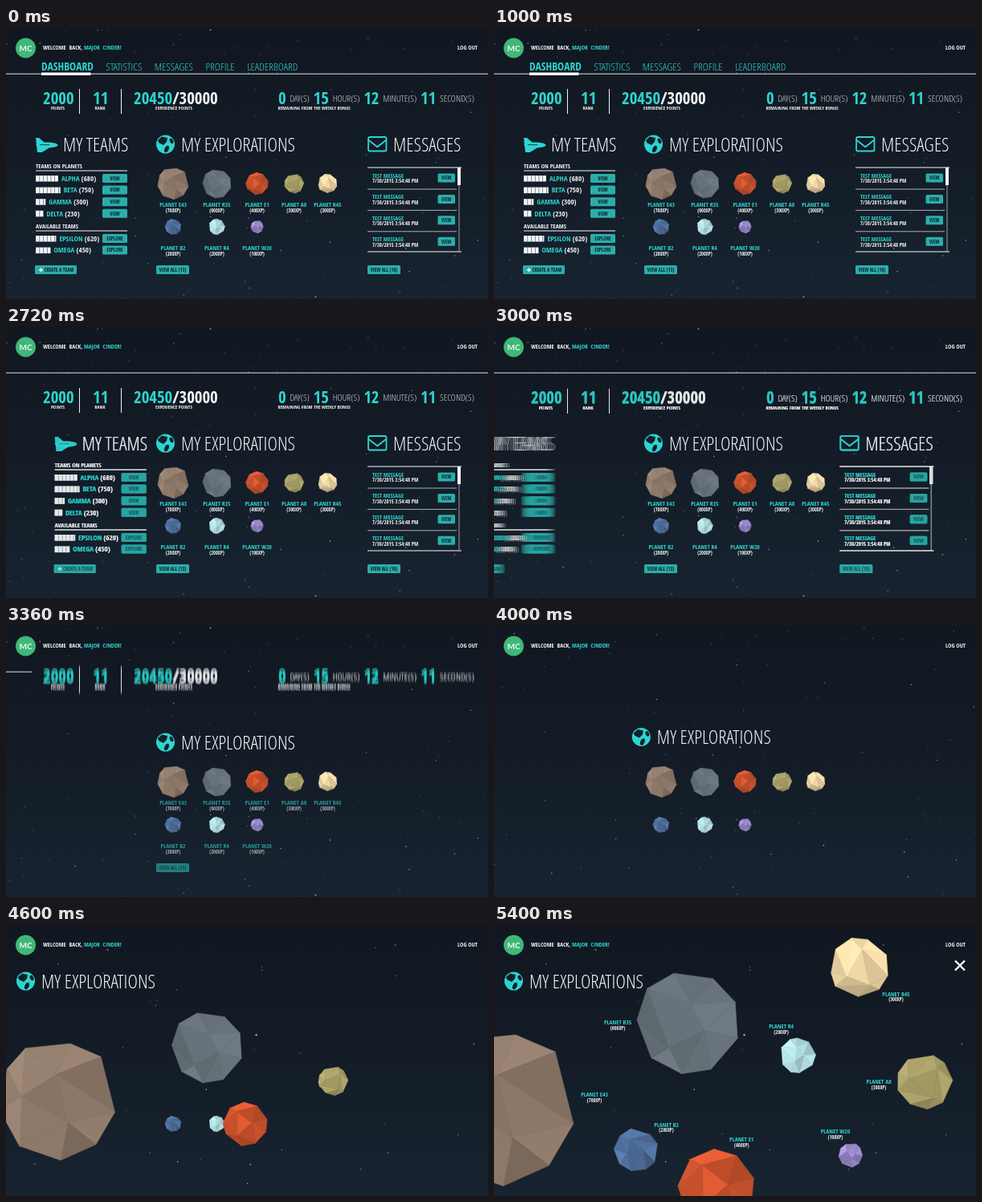
Recreate the animation shown at these times as an HTML page with a canvas. Size 600x338 px, loop 7 s.

```html
<!DOCTYPE html>
<html lang="en">
<head>
<meta charset="utf-8">
<title>Space dashboard</title>
<style>
html, body { margin: 0; width: 100%; height: 100%; overflow: hidden; background: #121a24 }
canvas { display: block }
</style>
</head>
<body>
<canvas id="stage" width="600" height="338"></canvas>
<script>
const ctx = document.getElementById('stage').getContext('2d');
const LOOP = 7000, CYAN = '#2dd5d0', WHITE = '#f4f6f7', TEAL = '#2aaeaa', DARK = '#10202b';
const TAU = Math.PI * 2, ZOOM = 1.9;

const clamp = v => Math.max(0, Math.min(1, v));
const span = (t, from, to) => clamp((t - from) / (to - from));
const inOut = p => p < .5 ? 4 * p ** 3 : 1 - 4 * (1 - p) ** 3;
const backIn = p => p * p * (2.7 * p - 1.7);
const mix = (a, b, p) => a + (b - a) * p;

function random(seed) {
  return () => (seed = (seed * 16807) % 2147483647) / 2147483647;
}

function setFont(weight, size) {
  const family = weight === 700 ? '"Open Sans Condensed", "Open Sans"' : '"Open Sans"';
  ctx.font = `${weight} ${size}px ${family}, sans-serif`;
  ctx.fontStretch = 'condensed';
}

// Where no condensed bold face is found, the whole bold face is narrowed by one ratio.
setFont(700, 100);
const narrow = ctx.measureText('0').width > 52 ? .77 : 1;

function text(str, x, y, size, color = WHITE, weight = 700, align = 'left') {
  const k = weight === 700 ? narrow : 1;
  setFont(weight, size);
  ctx.textAlign = align;
  ctx.fillStyle = color;
  ctx.save();
  ctx.translate(x, y);
  ctx.scale(k, 1);
  ctx.fillText(str, 0, 0);
  ctx.restore();
  return ctx.measureText(str).width * k;
}

function rect(x, y, w, h, color = WHITE) {
  ctx.fillStyle = color;
  ctx.fillRect(x, y, w, h);
}

function oval(x, y, rx, ry, color, turn = 0) {
  ctx.fillStyle = color;
  ctx.beginPath();
  ctx.ellipse(x, y, rx, ry, turn, 0, TAU);
  ctx.fill();
}

const disc = (x, y, r, color) => oval(x, y, r, r, color);

function poly(points, color) {
  ctx.fillStyle = color;
  ctx.beginPath();
  points.forEach(p => ctx.lineTo(p[0], p[1]));
  ctx.closePath();
  ctx.fill();
}

function button(label, x, y, w) {
  ctx.fillStyle = TEAL;
  ctx.beginPath();
  ctx.roundRect(x, y, w, 11, 1.5);
  ctx.fill();
  text(label, x + w / 2, y + 7.8, 6.2, DARK, 700, 'center');
}

function group(dx, dy, alpha, draw) {
  if (alpha <= 0) return;
  ctx.save();
  ctx.globalAlpha *= alpha;
  ctx.translate(dx, dy);
  draw();
  ctx.restore();
}

// Moves a group along offset(t), smeared over part of one frame's distance.
function moving(t, offset, vertical, draw) {
  const now = offset(t), step = now - offset(t - 40);
  const copies = Math.abs(step) < 1 ? 1 : 6;
  for (let i = 0; i < copies; i++) {
    const d = now - step * .4 * i / copies;
    group(vertical ? 0 : d, vertical ? d : 0, copies > 1 ? .36 : 1, draw);
  }
}

// Background
const sky = ctx.createLinearGradient(0, 0, 0, 338);
sky.addColorStop(0, '#111720');
sky.addColorStop(.5, '#131c27');
sky.addColorStop(1, '#172430');

const rnd = random(4127);
const stars = Array.from({ length: 130 }, () =>
  ({ x: rnd() * 600 - 300, y: rnd() * 338 - 169, r: .4 + rnd() ** 3 * .45, a: .4 + rnd() * .55 }));

function drawSky(t) {
  rect(0, 0, 600, 338, sky);
  const k = mix(1, ZOOM, inOut(span(t, 3800, 4560)));
  for (const { x, y, r, a } of stars) {
    ctx.globalAlpha = a;
    disc(300 + x * k, 169 + y * k, r * Math.sqrt(k), '#e9f1f5');
  }
  ctx.globalAlpha = 1;
}

// Planets: name, XP, colour, then the place, radius and label direction (degrees) after the flight
const planets = [
  ['E43', 700, [145, 124, 108], 6, 229, 97, -7],
  ['R35', 600, [103, 113, 121], 241, 121, 64, 178],
  ['E1', 400, [198, 81, 44], 277, 326, 47, -61],
  ['A8', 300, [168, 159, 104], 536, 195, 34, 177],
  ['R45', 300, [227, 204, 157], 455, 53, 37, 38],
  ['B2', 200, [80, 113, 158], 177, 281, 27, -38],
  ['R4', 200, [174, 217, 220], 378, 163, 22, -121],
  ['W20', 100, [153, 136, 200], 444, 287, 15, -125]
].map(([name, xp, rgb, x, y, r, degrees], i) => {
  const col = i % 5, row = Math.floor(i / 5), early = i < 4;
  const angle = degrees * Math.PI / 180, reach = r + 12 + 11 * Math.abs(Math.cos(angle));
  const start = (early ? 4180 : 4440) + 42 * i;
  return {
    name, xp, start, end: start + (early ? 720 : 460),
    from: [208 + 56.5 * col - 2.1 * col * col, 194 + 54 * row, 5.8 + .02 * xp],
    to: [x, y, r],
    label: [x + reach * Math.cos(angle), y + reach * Math.sin(angle)],
    facets: makeFacets(rgb, 31 + i * 977)
  };
});

function makeFacets(rgb, seed) {
  const rand = random(seed), facets = [];
  for (let i = 0; i < 5; i++) rand();
  const turn = rand() * TAU, jitter = amount => (rand() - .5) * amount;
  const ring = (count, radius, wobble) => Array.from({ length: count }, (_, i) => {
    const a = turn + (i + jitter(.5)) * TAU / count, d = radius + jitter(wobble);
    return [Math.cos(a) * d, Math.sin(a) * d];
  });
  const outer = ring(9, 1, .06), inner = ring(3, .5, .4);
  const add = (...pts) => {
    const [x, y] = [0, 1].map(k => (pts[0][k] + pts[1][k] + pts[2][k]) / 3);
    const light = 1 - x * .06 - y * .08 + jitter(.26);
    facets.push([pts, `rgb(${rgb.map(c => Math.min(255, c * light | 0))})`]);
  };
  add(...inner);
  for (let i = 0; i < 3; i++) {
    const a = inner[i], b = inner[(i + 1) % 3];
    const [p, q, r, s] = [0, 1, 2, 3].map(k => outer[(3 * i + k) % 9]);
    add(a, p, q);
    add(a, q, r);
    add(a, r, b);
    add(b, r, s);
  }
  return facets;
}

function drawPlanet({ from, to, start, end, facets }, t) {
  const p = inOut(span(t, start, end));
  const [x, y, r] = from.map((v, i) => mix(v, to[i], p));
  ctx.save();
  ctx.translate(x, y);
  ctx.scale(r, r);
  ctx.lineWidth = .6 / r;
  for (const [pts, color] of facets) {
    poly(pts, color);
    ctx.strokeStyle = color;
    ctx.stroke();
  }
  ctx.restore();
}

function planetLabel({ name, xp }, x, y) {
  text('PLANET ' + name, x, y, 7.5, CYAN, 700, 'center');
  text(`(${xp}XP)`, x, y + 6.8, 6.2, WHITE, 700, 'center');
}

// Panels
function drawHeader() {
  disc(24.5, 25, 12.5, '#3fb878');
  ctx.font = '700 10px Lato, sans-serif';
  ctx.textAlign = 'center';
  ctx.fillStyle = WHITE;
  ctx.fillText('MC', 24.5, 28.6);
  ctx.wordSpacing = '2px';
  text('WELCOME BACK,', 46, 27.2, 7.4);
  text('MAJOR CINDER!', 97, 27.2, 7.4, CYAN);
  ctx.wordSpacing = '0px';
  text('LOG OUT', 587, 27.2, 7.4, WHITE, 700, 'right');
}

function drawTabs() {
  let x = 44;
  for (const name of ['DASHBOARD', 'STATISTICS', 'MESSAGES', 'PROFILE', 'LEADERBOARD']) {
    x += text(name, x, 52.5, 13.6, CYAN, x > 44 ? 300 : 700) + 15.5;
  }
  rect(44, 55.5, 61.5, 3.5);
}

function drawStats() {
  const big = (s, x, color = CYAN) => text(s, x, 94.5, 20.8, color);
  const small = (s, x, align = 'center') => text(s, x, 102.3, 6, WHITE, 700, align);
  big('2000', 46);
  small('POINTS', 64.5);
  big('11', 108);
  small('RANK', 117);
  big('/30000', 159 + big('20450', 159), WHITE);
  small('EXPERIENCE POINTS', 209);
  rect(91, 76, 1, 31);
  rect(143, 76, 1, 31);
  let x = 339;
  for (const part of ['0', 'DAY(S)', '15', 'HOUR(S)', '12', 'MINUTE(S)', '11', 'SECOND(S)']) {
    x += 4.8 + (part.length > 2 ? text(part, x, 92, 11.7, '#d5dadd', 300) : big(part, x));
  }
  small('REMAINING FROM THE WEEKLY BONUS', 338.5, 'left');
}

function heading(str, x) {
  text(str, x, 153.8, 23.9, WHITE, 300);
}

function shuttle() {
  oval(51, 146, 13.5, 3.6, CYAN);
  poly([[37, 137], [41, 137], [48, 143], [56, 148], [45, 155], [39, 155]], CYAN);
  rect(42, 145.3, 12, .8, DARK);
}

function teamRow([name, value], y, action) {
  const w = value * .041;
  rect(37, y - 3.5, w, 7.5);
  for (let x = 41.5; x < 37 + w - 1; x += 4.7) rect(x, y - 3.5, .7, 7.5, '#52606a');
  const x = 41 + w;
  text(`(${value})`, x + text(name + ' ', x, y + 3.2, 9, CYAN), y + 3.2, 9);
  button(action, 120, y - 5.5, 31);
}

function teamList(title, y, action, teams) {
  text(title, 37, y, 7.6);
  rect(37, y + 2.8, 114, 1);
  teams.forEach((team, i) => teamRow(team, y + 12.8 + i * 14.6, action));
}

function drawTeams() {
  shuttle();
  heading('MY TEAMS', 71);
  teamList('TEAMS ON PLANETS', 174.7, 'VIEW',
    [['ALPHA', 680], ['BETA', 750], ['GAMMA', 300], ['DELTA', 230]]);
  teamList('AVAILABLE TEAMS', 249.7, 'EXPLORE', [['EPSILON', 620], ['OMEGA', 450]]);
  button('', 36, 296, 52);
  rect(41, 301, 5, 1.4);
  rect(42.8, 299.2, 1.4, 5);
  text('CREATE A TEAM', 47.5, 303.8, 6.2, DARK);
}

function drawMessages() {
  ctx.strokeStyle = CYAN;
  ctx.lineWidth = 1.8;
  ctx.beginPath();
  ctx.roundRect(451, 136, 22.5, 17.5, 2);
  ctx.moveTo(451.5, 140);
  ctx.lineTo(462.3, 148.3);
  ctx.lineTo(473, 140);
  ctx.stroke();
  heading('MESSAGES', 482);
  rect(450, 173.5, 117, 1);
  rect(450, 278.5, 117, 1);
  rect(563.5, 174, 1, 105, '#9aa2a8');
  rect(562, 174, 4, 22);
  for (let i = 0; i < 4; i++) {
    const y = i * 26.4;
    text('TEST MESSAGE', 456, 186.7 + y, 7.1, CYAN);
    text('7/30/2015 3:54:48 PM', 456, 193.4 + y, 6.6);
    button('VIEW', 537.5, 181.5 + y, 21.5);
    if (i < 3) rect(450, 200.5 + y, 111, 1, '#a9b0b5');
  }
  button('VIEW ALL (16)', 450, 296, 41);
}

function drawExplorations() {
  disc(198.5, 145, 11.5, CYAN);
  poly([[189, 140], [194, 135.5], [201, 137], [200, 142], [196, 146], [190, 143]], DARK);
  oval(200, 151, 2.6, 4.5, DARK, .4);
  oval(206, 141, 2.2, 3.4, DARK, -.4);
  heading('MY EXPLORATIONS', 218);
}

function drawTouch(t) {
  const r = 12 * inOut(span(t, 920, 1240)) * (1 - inOut(span(t, 1300, 1840)));
  if (r > 0) group(0, 0, .6, () => disc(207.5, 301.2, r, WHITE));
}

function drawClose(t) {
  group(580, 50.5, span(t, 5240, 5400), () => {
    ctx.strokeStyle = WHITE;
    ctx.lineWidth = 2.4;
    ctx.beginPath();
    for (const side of [-6, 6]) {
      ctx.moveTo(side, -6);
      ctx.lineTo(-side, 6);
    }
    ctx.stroke();
  });
}

const tabsX = t => -370 * span(t, 2040, 2600) ** 3;
const teamsX = t => -240 * backIn(span(t, 2440, 3120));
const messagesX = t => 200 * backIn(span(t, 2760, 3320));
const statsY = t => -120 * backIn(span(t, 2960, 3480));

function draw(t) {
  drawSky(t);
  drawHeader();
  if (t < 3520) {
    rect(0, 56.7, 600 * (1 - inOut(span(t, 2980, 3480))), 1, '#dfe4e7');
    moving(t, tabsX, false, drawTabs);
    moving(t, statsY, true, drawStats);
    moving(t, teamsX, false, drawTeams);
    moving(t, messagesX, false, drawMessages);
    group(0, 0, 1 - span(t, 3280, 3520), () => {
      planets.forEach((p, i) => planetLabel(p, p.from[0], i < 5 ? 222.8 : 276.8));
      button('VIEW ALL (13)', 187, 296, 41);
    });
  }
  for (let i = planets.length; i--;) drawPlanet(planets[i], t);
  const move = inOut(span(t, 3800, 4520));
  group(-174 * move, -75 * move, 1, drawExplorations);
  for (const p of planets) {
    group(0, 0, span(t, p.end - 120, p.end + 40), () => planetLabel(p, ...p.label));
  }
  drawTouch(t);
  drawClose(t);
}

const begin = performance.now();
function frame() {
  draw((performance.now() - begin) % LOOP);
  requestAnimationFrame(frame);
}
frame();
</script>
</body>
</html>
```
